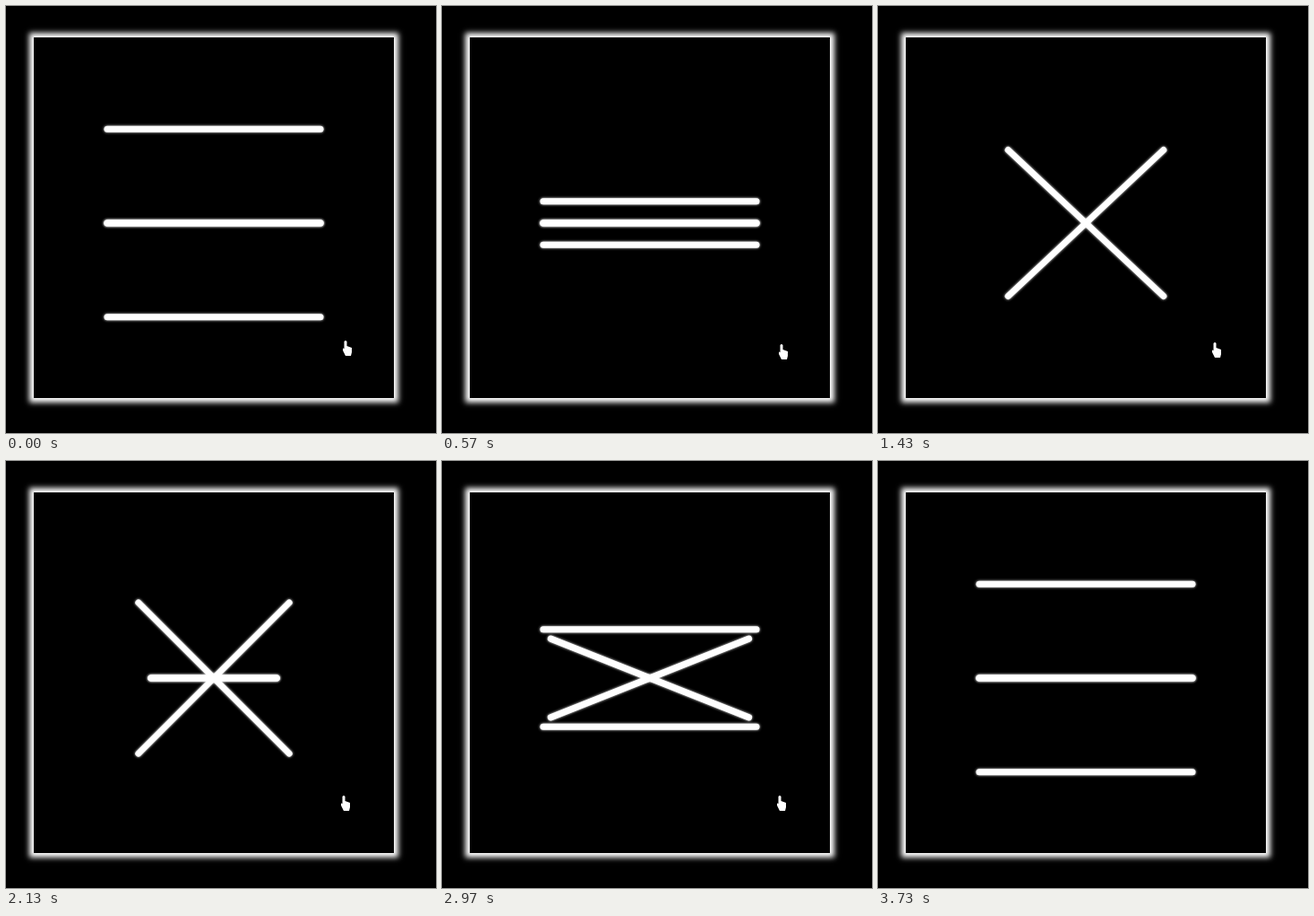
An HTML page with a canvas for the animation above (3760 ms loop, 480 by 476 pixels).

```html
<!DOCTYPE html>
<html lang="en">
<head>
<meta charset="utf-8">
<title>Menu toggle</title>
<style>
  html, body { margin: 0; width: 100%; height: 100%; overflow: hidden; background: #000; }
  .frame {
    position: absolute; left: 31px; top: 35px; width: 402px; height: 402px;
    background: #000; box-shadow: 0 0 6px 5px #fff;
  }
  canvas { position: absolute; left: 0; top: 0; }
</style>
</head>
<body>
<div class="frame"></div>
<canvas width="480" height="476"></canvas>
<script>
const ctx = document.querySelector('canvas').getContext('2d');
const LOOP = 3760, CX = 232, CY = 242, GAP = 104.7, HALF = 119;

// Moments where the picture stands still: [start, end]
const HOLDS = [[0, 70], [570, 670], [3200, 3300], [3400, 3500]];

// Pointer path: [time, dx, dy]
const PATH = [
  [0, 0, 0], [500, 0, 0], [570, 0, 4], [1000, 0, 19], [1200, 0, 19],
  [1430, -3, 2], [1630, -2, 0], [3300, -2, 0], [3400, 3, 46], [3500, 3, 70], [3760, 3, 70]
];
const POINTER_GONE = 3530;
const HAND = new Path2D('M-.5 1Q1 -1 2.5 1V6L8 8V13L7 17H1L-2 11V8.5L-.5 9Z');

function bezier(x1, y1, x2, y2) {
  const at = (a, b, u) => 3 * a * u * (1 - u) ** 2 + 3 * b * u * u * (1 - u) + u ** 3;
  return (time, start, duration) => {
    const x = Math.min(1, Math.max(0, (time - start) / duration));
    let lo = 0, hi = 1;
    for (let i = 0; i < 20; i++) {
      const mid = (lo + hi) / 2;
      if (at(x1, x2, mid) < x) lo = mid; else hi = mid;
    }
    return x === 0 || x === 1 ? x : at(y1, y2, lo);
  };
}
const ease = bezier(.25, .1, .25, 1);
const easeInOut = bezier(.42, 0, .58, 1);

function bar(y, half, angle) {
  const dx = half * Math.cos(angle), dy = half * Math.sin(angle);
  ctx.beginPath();
  ctx.moveTo(CX - dx, y - dy);
  ctx.lineTo(CX + dx, y + dy);
  ctx.stroke();
}

function drawBars(t) {
  const closing = ease(t, 2668, 1000);
  const merge = easeInOut(t, 50, 780) - closing;
  const angle = Math.PI / 4 * (ease(t, 982, 600) - closing);
  const half = HALF * (1 - ease(t, 830, 600) + ease(t, 1790, 1000));
  const offset = GAP * (1 - merge);

  ctx.lineCap = 'round';
  ctx.lineWidth = 7;
  ctx.strokeStyle = ctx.shadowColor = '#fff';
  ctx.shadowBlur = 3;
  if (half > 1) {
    bar(CY - offset, half, 0);
    bar(CY + offset, half, 0);
  }
  bar(CY, HALF, angle);
  bar(CY, HALF, -angle);
}

function drawPointer(t) {
  if (t >= POINTER_GONE) return;
  const i = PATH.findIndex(p => p[0] > t);
  const [t0, x0, y0] = PATH[i - 1], [t1, x1, y1] = PATH[i];
  const k = (t - t0) / (t1 - t0);
  ctx.shadowBlur = 0;
  ctx.translate(378 + x0 + (x1 - x0) * k, 373 + y0 + (y1 - y0) * k);
  ctx.lineWidth = 1.5;
  ctx.strokeStyle = '#000';
  ctx.stroke(HAND);
  ctx.fillStyle = '#fff';
  ctx.fill(HAND);
}

function draw(now) {
  let t = now % LOOP;
  for (const [start, end] of HOLDS) if (t >= start && t < end) t = start;
  ctx.clearRect(0, 0, 480, 476);
  ctx.save();
  drawBars(t);
  drawPointer(t);
  ctx.restore();
}

const begin = performance.now();
function tick() {
  draw(performance.now() - begin);
  requestAnimationFrame(tick);
}
tick();
</script>
</body>
</html>
```
